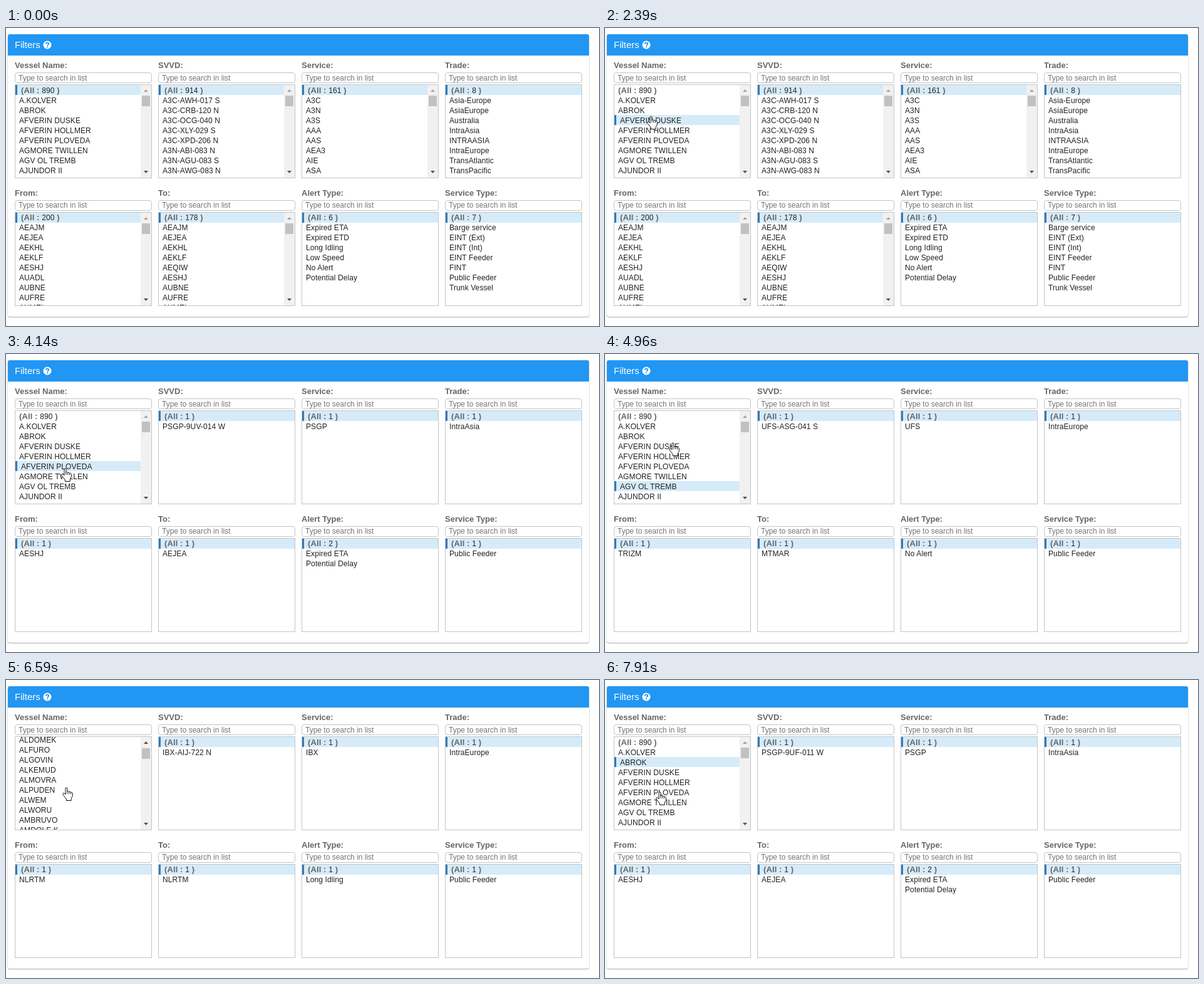
An HTML page that plays this animation: 947 by 476 pixels, repeating every 8 s.

```html
<!DOCTYPE html>
<html lang="en">
<head>
<meta charset="utf-8">
<title>Filters</title>
<style>
html, body { margin: 0; width: 100%; height: 100%; overflow: hidden; background: #fff; }
body { position: relative; font: 12px/16px "Liberation Sans", Arial, sans-serif; color: #222; }
div, svg { position: absolute; box-sizing: border-box; white-space: pre; }
.panel { left: 3px; top: 10px; width: 928px; height: 451px; border-radius: 3px; background: #fff;
  box-shadow: 0 1px 2px rgba(0,0,0,.32), 0 0 1px rgba(0,0,0,.25); }
.head { left: 0; top: 0; width: 100%; height: 34px; border-radius: 3px 3px 0 0; background: #2196f3;
  color: #fff; font-size: 15px; line-height: 34px; padding-left: 11px; }
.label { font-weight: bold; font-size: 13px; color: #666; }
.search { width: 219px; height: 17px; border: 1px solid #c4c4c4; border-radius: 4px;
  padding: .5px 0 0 5px; line-height: 15px; color: #757575; }
.list { width: 219px; height: 150px; border: 1px solid #c4c4c4; overflow: hidden; }
.rows { left: 0; top: 0; width: 100%; }
.row { left: 0; width: 100%; height: 16px; padding: .5px 0 0 6px; letter-spacing: .1px; }
.row.on { background: #d6ebf9; border-left: 3px solid #337ab7; }
.row b { font-size: 13px; color: #666; }
.bar { right: 0; top: 0; width: 17px; height: 148px; background: #f1f1f1; }
.thumb { left: 2px; width: 13px; height: 17px; background: #c1c1c1; }
</style>
</head>
<body>
<div class="panel"><div class="head">Filters</div></div>
<svg style="left:59px;top:20px" width="14" height="14">
  <circle cx="7" cy="7" r="6.5" fill="#fff"/>
  <path d="M4.7 5.5Q5 3.4 7 3.4Q9.2 3.5 9.2 5.3Q9.2 6.4 8 7Q7.1 7.5 7.1 8.4M7.1 9.4V11.2" fill="none" stroke="#2196f3" stroke-width="1.8"/>
</svg>
<div id="lists"></div>
<svg id="hand" width="18" height="23" style="left:0;top:0">
  <path d="M5 12V1.7Q6.4 .1 7.9 1.7V7Q9.6 5.8 10.7 7.5Q12.4 6.6 13.4 8.3Q15.7 7.8 16.3 9.8V14.2L14.2 18.3V21.5H6.3V19L.9 12.2Q.2 10 1.9 9.5Q3.4 9.7 5 12Z" fill="#fff" stroke="#111" stroke-linejoin="round"/>
  <path d="M7.9 7V11M10.7 7.5V11M13.4 8.3V11.5" stroke="#111" stroke-width=".9"/>
</svg>
<script>
const LOOP = 8000, TICK = 131, ROW = 16, SCROLLED = 293;
const split = s => s.split(",");

const titles = split("Vessel Name,SVVD,Service,Trade,From,To,Alert Type,Service Type");
const vessels = split("A.KOLVER,ABROK,AFVERIN DUSKE,AFVERIN HOLLMER,AFVERIN PLOVEDA,AGMORE TWILLEN,AGV OL TREMB," +
  "AJUNDOR II,AKVORDEL,AKWENDO,ALBRUVEN,ALDOMEK,ALFURO,ALGOVIN,ALKEMUD,ALMOVRA,ALPUDEN,ALWEM,ALWORU,AMBRUVO," +
  "AMDOLE K.,AMGUREL,AMKOVE D,AMPOLVEK,ANGO DREM,ANV TORMILEK,ANV WEDROLUKA,ANVOLUR");

// "total|rows"; without a total the rows are counted
const lists = (...cols) => cols.map(c => {
  const [rows, total] = c.split("|").reverse();
  return { total: total || split(rows).length, rows: split(rows) };
});
const all = lists(
  "914|A3C-AWH-017 S,A3C-CRB-120 N,A3C-OCG-040 N,A3C-XLY-029 S,A3C-XPD-206 N,A3N-ABI-083 N,A3N-AGU-083 S,A3N-AWG-083 N,A3N-AWF-083 S",
  "161|A3C,A3N,A3S,AAA,AAS,AEA3,AIE,ASA,ATE1",
  "Asia-Europe,AsiaEurope,Australia,IntraAsia,INTRAASIA,IntraEurope,TransAtlantic,TransPacific",
  "200|AEAJM,AEJEA,AEKHL,AEKLF,AESHJ,AUADL,AUBNE,AUFRE,AUMEL",
  "178|AEAJM,AEJEA,AEKHL,AEKLF,AEQIW,AESHJ,AUBNE,AUFRE,AUMEL",
  "Expired ETA,Expired ETD,Long Idling,Low Speed,No Alert,Potential Delay",
  "Barge service,EINT (Ext),EINT (Int),EINT Feeder,FINT,Public Feeder,Trunk Vessel");
const one = (voyage, trade, from, to, alerts) =>
  lists(voyage, voyage.split("-")[0], trade, from, to, alerts, "Public Feeder");
const third = one("PSGP-9QD-108 W", "IntraAsia", "AEJEA", "IRBUZ", "Expired ETD");

// The row lights up at once, the other lists follow one tick later.
const clicks = [
  { t: -TICK, row: 0, view: all },
  { t: 2390, row: 3, view: third },
  { t: 3690, row: 5, view: one("PSGP-9UV-014 W", "IntraAsia", "AESHJ", "AEJEA", "Expired ETA,Potential Delay") },
  { t: 4345, row: 7, view: one("UFS-ASG-041 S", "IntraEurope", "TRIZM", "MTMAR", "No Alert") },
  { t: 5230, row: 3, view: third },
  { t: 6016, row: 24, view: one("IBX-AIJ-722 N", "IntraEurope", "NLRTM", "NLRTM", "Long Idling") },
  { t: 7245, row: 2, view: one("PSGP-9UF-011 W", "IntraAsia", "AESHJ", "AEJEA", "Expired ETA,Potential Delay") }
];

// Bursts of activity: [start, ticks]; the picture rests between them.
const bursts = [[370, 7], [1430, 1], [2390, 8], [3690, 8], [4810, 2], [5230, 8], [6590, 8], [7640, 3]];
// Key points: [time, x, y] of the pointer, [time, offset] of the vessel list
const path = [[370, 180, 373], [890, 82, 127], [1150, 67, 140], [2521, 67, 140], [3045, 88, 179],
  [4000, 88, 179], [4470, 85, 212], [4680, 85, 212], [4941, 102, 141], [5361, 102, 141], [5885, 93, 184],
  [6400, 93, 184], [6852, 86, 149], [7114, 80, 130], [7376, 80, 130], [7902, 81, 178]];
const scrolling = [[5361, 0], [5754, SCROLLED], [6459, SCROLLED], [6800, 0]];

const clickAt = t => clicks.filter(c => c.t <= t).pop();

function held(t) {
  const burst = bursts.filter(b => b[0] <= t).pop();
  if (!burst) return 0;
  const [start, ticks] = burst;
  return start + TICK * Math.min(ticks - 1, Math.floor((t - start) / TICK));
}

// Eased values between the two key points around t
function along(keys, t) {
  const next = keys.findIndex(k => k[0] > t);
  if (next < 1) return (next ? keys[keys.length - 1] : keys[0]).slice(1);
  const [a, b] = [keys[next - 1], keys[next]];
  const p = (t - a[0]) / (b[0] - a[0]), ease = p * p * (3 - 2 * p);
  return a.map((v, i) => Math.round(v + (b[i] - v) * ease)).slice(1);
}

function rowHtml(text, i, on) {
  return `<div class="row${on ? " on" : ""}" style="top:${i * ROW}px">${text}</div>`;
}

function barHtml(scroll) {
  const thumb = 17 + Math.round(scroll / SCROLLED);
  return `<div class="bar"><div class="thumb" style="top:${thumb}px"></div><svg width="17" height="148">
    <path d="M5 11L8.5 7L12 11Z" fill="${scroll ? "#505050" : "#a3a3a3"}"/>
    <path d="M5 137L8.5 141L12 137Z" fill="#505050"/></svg></div>`;
}

function columnHtml({ total, rows }, n, pick, scroll) {
  const x = 14 + n % 4 * 229, y = .25 + (n < 4 ? 0 : 203.5);
  const place = top => `style="left:${x}px;top:${y + top}px"`;
  const head = `<b>(All : </b>${total}<b> )</b>`;
  const items = [head, ...rows].map((r, i) => rowHtml(r, i, i === pick)).join("");
  return `<div class="label" ${place(52)}>${titles[n]}:</div>
    <div class="search" ${place(71)}>Type to search in list</div>
    <div class="list" ${place(90)}><div class="rows" style="top:${-scroll}px">${items}</div>${
      rows.length > 8 ? barHtml(scroll) : ""}</div>`;
}

const box = document.getElementById("lists");
const hand = document.getElementById("hand");
let shown = -1;

function draw(time) {
  const t = held(time);
  if (t === shown) return;
  shown = t;
  const { row } = clickAt(t), { view } = clickAt(t - TICK), [scroll] = along(scrolling, t);
  const cols = [{ total: 890, rows: vessels }, ...view];
  box.innerHTML = cols.map((c, n) => columnHtml(c, n, n ? 0 : row, n ? 0 : scroll)).join("");
  const [x, y] = along(path, t);
  hand.style.display = t ? "" : "none";
  hand.style.transform = `translate(${x}px,${y}px)`;
}

const start = performance.now();
function tick() {
  draw((performance.now() - start) % LOOP);
  requestAnimationFrame(tick);
}
tick();
</script>
</body>
</html>
```
